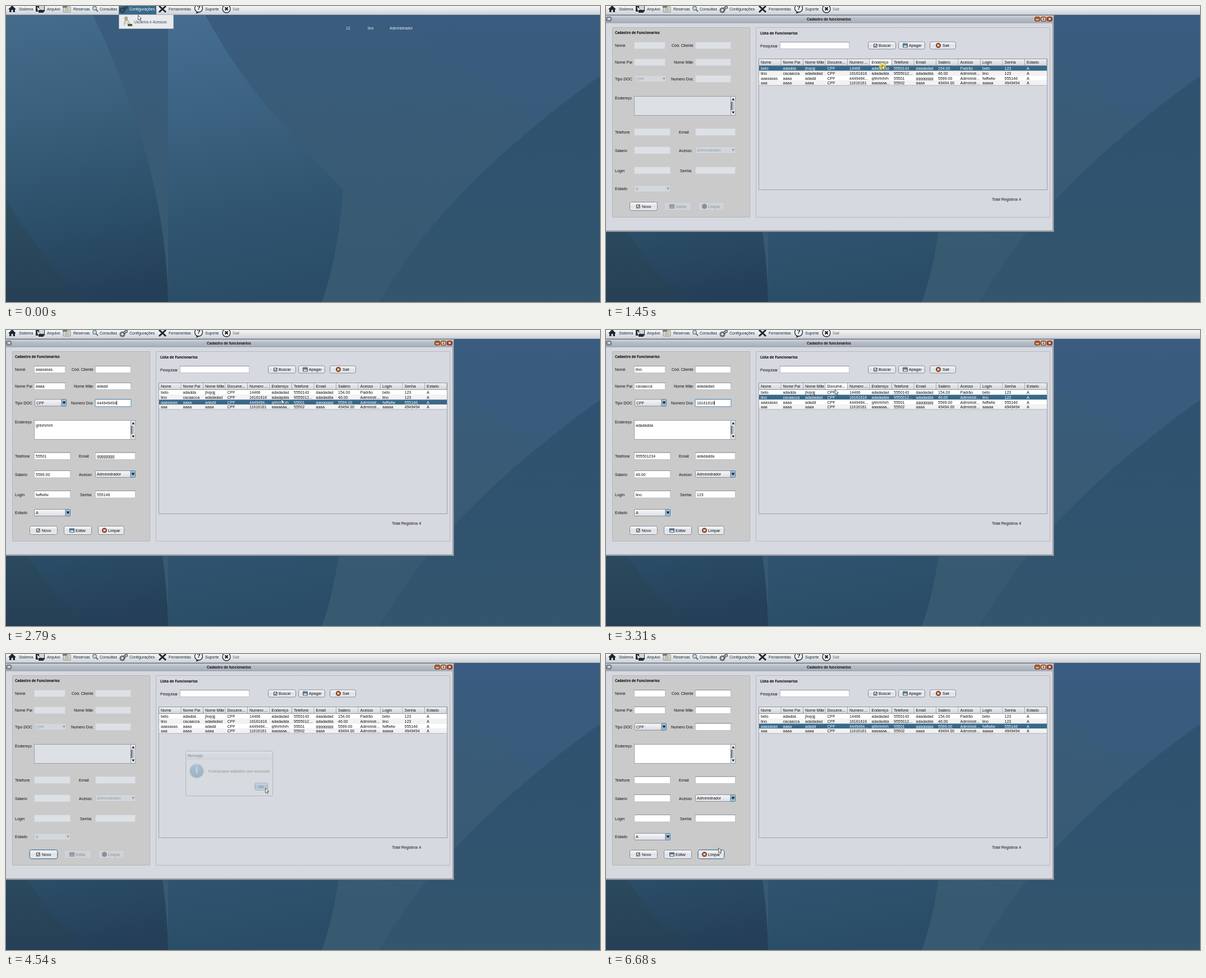
An HTML page with a canvas that plays this animation: 1059 px wide and 529 px high, repeating every 6.76 s.

```html
<!DOCTYPE html>
<html lang="pt">
<head>
<meta charset="utf-8">
<title>Cadastro de funcionarios</title>
<style>
html, body { margin: 0; width: 100%; height: 100%; overflow: hidden; background: #3a5d7c; }
canvas { display: block; }
</style>
</head>
<body>
<canvas id="stage" width="1059" height="529"></canvas>
<script>
const g = document.getElementById('stage').getContext('2d');
const LOOP = 6760;
// [first change, last change, steps]: the screen is only refreshed on these ticks
const TICKS = [[80, 550, 7], [800, 1450, 9], [1530, 1630, 2], [1780, 2450, 9], [2630, 2790, 3],
  [2960, 3550, 8], [3640, 4300, 9], [4380, 5020, 9], [5100, 5760, 9], [5840, 6090, 4], [6680, 6680, 1]];
const PATH = [[0, 235, 16], [80, 235, 24], [155, 235, 31], [240, 235, 31], [550, 485, 70], [960, 489, 70],
  [1370, 492, 105], [1780, 492, 105], [1863, 492, 118], [2115, 492, 128], [2198, 491, 133], [2450, 491, 137],
  [2630, 491, 128], [2960, 490, 118], [3128, 460, 114], [3297, 408, 106], [3381, 260, 26], [3466, 120, 220],
  [3550, 80, 384], [3640, 90, 380], [3805, 126, 357], [3970, 126, 357], [4300, 455, 238], [4380, 461, 239],
  [4540, 462, 239], [4620, 462, 239], [5020, 470, 130], [5430, 460, 132], [5760, 284, 300], [5923, 190, 356],
  [6090, 190, 356], [6680, 200, 346]];
const PICKS = [[0, -1], [1440, 0], [1770, 1], [2110, 2], [2360, 3], [2625, 2], [2955, 1], [4455, -1], [5175, 2]];
const LOADED = 870, SAVED = 3965, CLOSED = 4455, CLEARED = 6085;

// "|" marks where a narrow cell cuts the value
const HEAD = 'Nome,Nome Pai,Nome Mãe,Docume|,Numero |,Endereço,Telefone,Email,Salário,Acesso,Login,Senha,Estado'.split(',');
const ROWS = [
  'beto,adadda,jhojojj,CPF,14466,adadadad,5550143,daadadad,154.00,Padrão,beto,123,A',
  'lino,cacaacca,adadadad,CPF,16161616,adadadda,9555012|34,adadadda,46.00,Administr|ador,lino,123,A',
  'aaasasas,aaaa,adadd,CPF,4449494|94,ghhrhrhrh,55501,gggggggg,5599.00,Administr|ador,fwffwfw,555146,A',
  'aaa,aaaa,aaaa,CPF,11616161,aaaaaaa|aaa,55502,aaaa,49494.00,Administr|ador,aaaaa,4949494,A'
].map(r => r.split(','));
const BLANK = ',,,CPF,,,,,,Administr|ador,,,A'.split(',');
const cell = s => s.replace(/\|.*/, '...');
const full = s => s.replace('|', '');

function rect(x, y, w, h, fill, line, r = 0) {
  g.beginPath();
  g.roundRect(x, y, w, h, r);
  if (fill) { g.fillStyle = fill; g.fill(); }
  if (line) { g.strokeStyle = line; g.lineWidth = 1; g.stroke(); }
}
function dot(x, y, r, fill, line, width = 1) {
  g.beginPath();
  g.arc(x, y, r, 0, 7);
  if (fill) { g.fillStyle = fill; g.fill(); }
  if (line) { g.strokeStyle = line; g.lineWidth = width; g.stroke(); }
}
function shape(d, fill, line, width = 1) {
  const p = new Path2D(d);
  if (fill) { g.fillStyle = fill; g.fill(p); }
  if (line) { g.strokeStyle = line; g.lineWidth = width; g.stroke(p); }
}
function text(s, x, y, color = '#111', size = 7, style = '', align = 'left') {
  g.font = `${style} ${size}px "Liberation Sans", Arial, sans-serif`;
  g.textAlign = align;
  g.fillStyle = color;
  g.fillText(s, x, y + 2.5);
}
function heading(s, x, y) {
  g.font = 'bold 6.3px "Noto Sans", sans-serif';
  g.textAlign = 'left';
  g.fillStyle = '#000';
  g.fillText(s, x, y + 2.4);
}
function fade(x0, y0, x1, y1, ...colors) {
  const f = g.createLinearGradient(x0, y0, x1, y1);
  colors.forEach((c, i) => f.addColorStop(i / (colors.length - 1), c));
  return f;
}
const down = (y0, y1, ...colors) => fade(0, y0, 0, y1, ...colors);

function desktop() {
  rect(0, 0, 1059, 529, down(16, 529, '#3a5d7f', '#395b75', '#36586f'));
  shape('M740 50L948 212L1059 125V16H640Z', '#3a5c8055');
  shape('M598 320L682 402L820 529H560Z', '#3b5e7355');
  shape('M355 16Q420 135 500 218Q545 270 601 328Q592 450 563 529H289V16Z',
    fade(300, 16, 400, 529, '#456e91', '#3d6383', '#315671', '#2a4c67'));
  shape('M0 16H155Q286 290 289 529H0Z', fade(60, 16, 150, 529, '#456b8b', '#3a607d', '#2d516b', '#243f57'));
  shape('M0 345Q62 450 140 529H0Z', down(345, 529, '#2d4f61', '#263f54'));
  shape('M1059 125Q780 325 665 529H1059Z', down(125, 529, '#2f5270', '#30536f', '#34566c'));
}

function menuIcons() {
  shape('M4 6L11 -1L18 6H16V11H12.5V7H9.5V11H6V6Z', '#1c2530');
  rect(53, -2, 16, 12, '#262b33');
  rect(59, 0, 9, 7, '#cfd5db');
  shape('M55 1L62 7L59 7L57 10Z', '#fff', '#222', .5);
  rect(58, 10, 9, 2, '#262b33');
  rect(102, 1, 13, 10, '#d8d8cf', '#8d8f88', 1);
  rect(101, -1, 8, 4, '#6f7b70');
  shape('M105 5H112M105 8H112', null, '#8c9087');
  dot(158, 4, 3.3, '#c6dbe6', '#5b7383', 1.2);
  shape('M160.5 6.5L164 10', null, '#6d6458', 1.8);
  g.setLineDash([1.5, 1]);
  dot(207.5, 7.5, 3.6, null, '#20262d', 3);
  dot(214, 2.5, 2.2, null, '#20262d', 2.2);
  g.setLineDash([]);
  shape('M273 0L285 11M285 0L273 11', null, '#20262d', 3);
  shape('M340 10L339 14L345 11', '#20262d');
  dot(343.5, 4, 7, '#eef0f2', '#20262d', 1.3);
  text('?', 343.5, 4.5, '#111', 10, 'bold', 'center');
  dot(393, 5, 7, '#eef0f2', '#20262d', 1.3);
  shape('M390.5 2.5L395.5 7.5M395.5 2.5L390.5 7.5', null, '#111', 2);
}

function menuBar(open) {
  rect(0, 0, 1059, 15.5, down(0, 15, '#f4f5f6', '#e2e4e7', '#ced2d7'));
  rect(0, 15, 1059, 1, '#a4abb3');
  if (open) rect(201, 0, 67, 15, '#39698a');
  menuIcons();
  const items = { Sistema: 23, Arquivo: 73, Reservas: 120, Consultas: 167, 'Configurações': 220,
    Ferramentas: 290, Suporte: 355, Sair: 404 };
  for (const [name, x] of Object.entries(items))
    text(name, x, 5.5, open && x === 220 ? '#fff' : name === 'Sair' ? '#666' : '#17293a');
  if (!open) return;
  rect(201.5, 15.5, 97, 25, '#e9ebee', '#aab0b8');
  dot(214, 22, 2.5, '#d4bd8c', '#5a5540', .7);
  shape('M210 34L212 26L217 25L221 32', '#d6dad0', '#777f70', .7);
  rect(217, 32, 8, 4, '#4a5a42');
  text('Usuários e Acessos', 228, 28, '#3c4650', 6.65);
}

const check = x => y => {
  rect(x + .5, y - 2.5, 5.5, 5.5, '#fff', '#333');
  shape(`M${x + 1.5} ${y}l1.5 1.8l3 -4`, null, '#222');
};
const disk = x => (y, off) => {
  rect(x, y - 4, 9, 8, off ? '#8f9398' : '#56626e', null, 1);
  rect(x + 1, y - 4, 7, 2, off ? '#a0a4a9' : '#5c9bd0');
  rect(x + 1.5, y, 6, 3, off ? '#a7abb0' : '#dfe4e8');
};
const cross = x => (y, off) => {
  dot(x, y, 4.5, off ? '#8b8f94' : '#8c3f1c');
  if (!off) shape(`M${x - 1.8} ${y - 1.8}l3.6 3.6m0 -3.6l-3.6 3.6`, null, '#fff', 1.4);
};
function button(x, y, w, h, label, tx, icon, off, focus) {
  if (focus) rect(x - .5, y - .5, w + 1, h + 1, null, '#739fc4', 4);
  rect(x + .5, y + .5, w - 1, h - 1,
    off ? '#cfd2d6' : down(y, y + h, '#fafbfc', '#dfe2e7', '#e9ecf0'), off ? '#bfc3c8' : '#858c96', 3);
  icon(y + h / 2, off);
  text(label, tx, y + h / 2 + .3, off ? '#8e9196' : '#111');
}

function field(x, y, w, h, value, on, focus) {
  rect(x + .5, y + .5, w - 1, h - 1, on ? '#fff' : '#dde0e5', on ? '#bcc0c5' : '#cdd1d6');
  if (on) rect(x, y, w, 1, '#8d9196');
  if (focus) rect(x, y, w, h, null, '#6a9fcb', 1);
  text(value, x + 3, h > 20 ? y + 9 : y + h / 2 + .3);
  if (focus) rect(x + 3 + g.measureText(value).width, y + 3, .8, h - 6, '#000');
}
function combo(x, y, w, value, on) {
  rect(x + .5, y + .5, w - 1, 12, on ? down(y, y + 12, '#f7f8fa', '#dcdfe4') : '#d3d7dc', on ? '#8a9098' : '#c0c5cb', 2);
  if (on) rect(x + w - 9, y + .5, 8.5, 12, down(y, y + 12, '#b4cde1', '#7fa5c4', '#a5c6df'), '#5f7f9a', 1);
  shape(`M${x + w - 7} ${y + 4.5}h5l-2.5 4.5z`, on ? '#111' : '#989ea5');
  text(value, x + 3, y + 6.5, on ? '#111' : '#8e9aa6');
}

function form(s, picked) {
  const on = picked >= 0, wiped = s >= CLEARED;
  const v = (on && !wiped ? ROWS[picked] : BLANK).map(full);
  rect(11.5, 38.5, 245, 339, '#cacaca', '#b3b6ba');
  heading('Cadastro de Funcionarios', 16, 47.5);
  [['Nome', 16, 70], ['Cód. Cliente', 117, 70], ['Nome Pai', 16, 100], ['Nome Mãe', 121, 100], ['Tipo DOC', 16, 130],
    ['Numero Doc', 116, 130], ['Endereço', 16, 164.5], ['Telefone', 16, 225], ['Email', 130, 225], ['Salario', 16, 258],
    ['Acesso', 130, 258], ['Login', 16, 294], ['Senha', 132, 294], ['Estado', 16, 326.5]
  ].forEach(l => text(...l));
  field(50, 64, 56, 13, v[0], on);
  field(159, 64, 64, 13, '', on);
  field(50, 94, 56, 13, v[1], on);
  field(159, 94, 64, 13, v[2], on);
  combo(51, 123.5, 57, v[3], on);
  field(159, 123.5, 64, 13.5, v[4], on, on && !wiped && (s < SAVED || s > CLOSED));
  field(50, 161, 173, 35, v[5], on);
  rect(50.5, 161.5, 180, 34, null, '#9a9fa6');
  rect(222.5, 161.5, 8, 34, '#e3e6ea', '#9a9fa6');
  rect(222.5, 171, 8, 15, fade(222, 0, 231, 0, '#4c545d', '#b9c0c8', '#e6e9ed'));
  shape('M224.5 168.5h4.5l-2.2 -4zM224.5 188.5h4.5l-2.2 4z', '#111');
  field(50, 218.5, 65, 13.5, v[6], on);
  field(159, 218.5, 72, 13.5, v[7], on);
  field(50, 251, 65, 13.5, v[8], on);
  combo(159, 251, 72, v[9], on);
  field(50, 287, 65, 13.5, v[10], on);
  field(159, 287, 72, 13.5, v[11], on);
  combo(50, 320, 65, v[12], on);
  button(42, 350, 50, 16, 'Novo', 64, check(54), false, s < LOADED || s >= CLOSED && !on);
  button(103, 350, 50, 16, s < 1500 ? 'Salvar' : 'Editar', 124, disk(113), !on);
  button(164, 350, 47, 16, 'Limpar', 182, cross(175.5), !on, wiped);
}

function list(s, selected, mx, my) {
  const colX = i => 273 + 39.5 * i, loaded = s >= LOADED;
  rect(267.5, 38.5, 524, 339, null, '#b6bac1');
  heading('Lista de Funcionarios', 275, 48.5);
  text('Pesquisar', 275, 71);
  field(310, 64, 124, 13, '', true);
  button(467, 63.5, 50, 14, 'Buscar', 486, check(477), false, loaded && s < 1440);
  button(521, 63.5, 48, 14, 'Apagar', 540, disk(529));
  button(577, 63.5, 47, 14, 'Sair', 600, cross(592.5));
  rect(272.5, 94.5, 514, 234, null, '#9da3ab');
  HEAD.forEach((h, i) => {
    const hover = my >= 94 && my <= 106 && mx >= colX(i) && mx < colX(i + 1);
    rect(colX(i), 94, 39.5, 12.5, hover ? down(94, 106, '#fff', '#eceef1') : down(94, 106, '#f0f1f3', '#d3d6db'));
    rect(colX(i + 1) - 1, 94, 1, 12.5, '#9da3ab');
    text(cell(h), colX(i) + 3, 100.5);
  });
  rect(272.5, 94.5, 514, 12, null, '#8f959d');
  if (loaded) ROWS.forEach((r, j) => {
    const y = 107 + 8.75 * j, hit = j === selected;
    rect(273, y, 513, 8.75, hit ? '#39698a' : j % 2 ? '#f2f2f3' : '#fff');
    r.forEach((c, i) => text(cell(c), colX(i) + 3, y + 4.7, hit ? '#fff' : '#111'));
  });
  if (loaded) rect(273, 141.5, 513, .8, '#9da3ab');
  text('Total Registros ' + (loaded ? 4 : 0), 688, 345);
}

function windowFrame() {
  rect(0, 16, 799, 388, '#b3b9c2');
  rect(0, 16, 799, 14, down(16, 30, '#d3d7dd', '#b4bbc5', '#a8b0bb'));
  rect(-1, 30, 797.5, 371.5, '#d6d9df', '#8c939d');
  rect(-1, 16.5, 799.5, 387, null, '#646d79');
  text('Cadastro de funcionarios', 397.5, 23.5, '#111', 6.55, 'bold', 'center');
  rect(.5, 19.5, 9, 7.5, '#929ca9', '#55606d', 2);
  shape('M3 22h5l-2.5 3z', '#fff');
  [764, 775, 786].forEach((x, i) => {
    rect(x + .5, 19.5, 9, 7.5, i < 2 ? '#b5622a' : '#a63d22', '#6b3416', 2);
    shape([`M${x + 2.5} 24.5h5`, `M${x + 2.5} 21.5h5v4h-5z`, `M${x + 3} 21.2l4 4m0 -4l-4 4`][i], null, '#fff', 1.2);
  });
}

function dialog(alpha) {
  if (alpha <= 0) return;
  g.globalAlpha = alpha;
  rect(320.5, 173.5, 155, 80, '#d6d9df', '#6f7884', 2);
  rect(321, 174, 154, 15, down(174, 189, '#e6e9ed', '#c3c9d1'));
  text('Message', 324, 181.5, '#333', 6.5, 'bold');
  dot(340, 209, 12.5, down(196, 222, '#5c92bf', '#2e628f'));
  text('i', 340, 210.5, '#fff', 20, 'bold', 'center');
  text('Funcionario editados com sucesso!', 361, 209.5);
  rect(443.5, 230.5, 23, 13, down(230, 244, '#bdd3e6', '#6d99bf', '#a3c4de'), '#3f6f98', 3);
  text('OK', 455, 237.5, '#111', 7, '', 'center');
  g.globalAlpha = 1;
}

function pointer(x, y, clicking) {
  if (clicking) dot(x + 1, y + 3, 6.5, '#f2dc2fb0');
  g.save();
  g.translate(x, y);
  shape('M.5 .5V9L2.5 7.2L4 10.5L5.4 9.8L4 6.6H6.6Z', '#fff', '#333', .8);
  g.restore();
}

function refreshTime(t) {
  const tick = TICKS.findLast(k => t >= k[0]);
  if (!tick) return 0;
  const [a, b, n] = tick;
  if (n === 1) return a;
  const step = (b - a) / (n - 1);
  return a + step * Math.min(n - 1, Math.floor((t - a + 6) / step));
}
function pointerAt(s) {
  const i = PATH.findLastIndex(k => s >= k[0]);
  const [ta, xa, ya] = PATH[i], [tb, xb, yb] = PATH[i + 1] || [LOOP, xa, ya];
  const u = (s - ta) / (tb - ta);
  return [xa + (xb - xa) * u, ya + (yb - ya) * u];
}
const pickAt = s => PICKS.findLast(p => Math.max(0, s) >= p[0]);

function draw(t) {
  const s = refreshTime(t), open = s < 150;
  const [x, y] = pointerAt(s), pick = pickAt(s);
  desktop();
  if (open) {
    text('12', 606, 39, '#e8eef3', 6.65);
    text('lino', 645, 39, '#e8eef3', 6.65);
    text('Administrador', 684, 39, '#e8eef3', 6.65);
  }
  menuBar(open);
  if (!open) {
    windowFrame();
    form(s, pickAt(s - 75)[1]);
    list(s, pick[1], x, y);
    dialog(Math.min(1, (s - SAVED + 80) / 160, (4620 - s) / 230));
  }
  pointer(x, y, pick[1] >= 0 && s - pick[0] < 75);
}

const start = performance.now();
function loop() {
  draw((performance.now() - start) % LOOP);
  requestAnimationFrame(loop);
}
loop();
</script>
</body>
</html>
```
